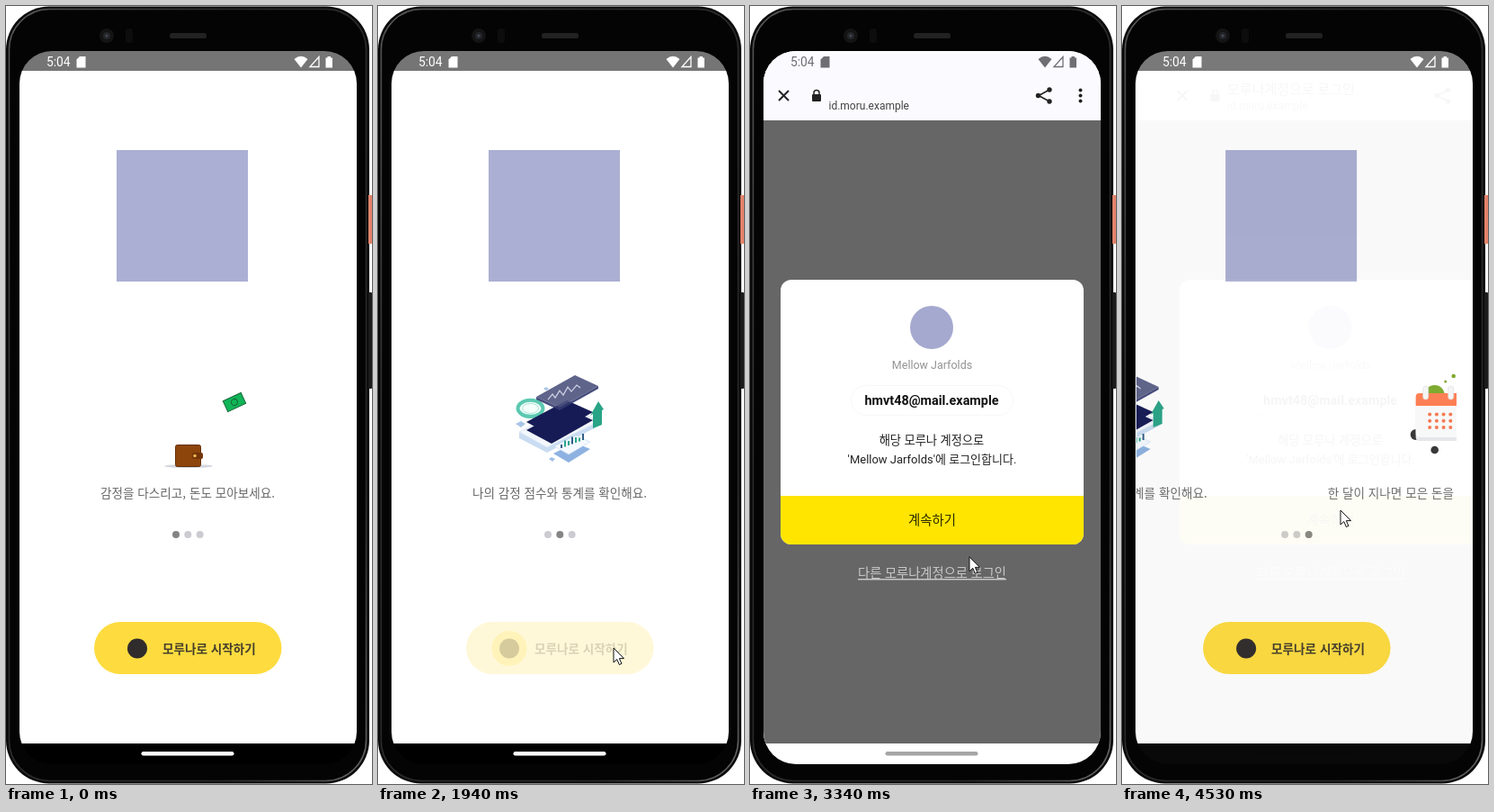
Recreate the animation shown at these times as an HTML page. Size 407x864 px, loop 4600 ms.

```html
<!DOCTYPE html>
<html lang="ko">
<head>
<meta charset="utf-8">
<title>Login flow</title>
<style>
  html, body { margin: 0; width: 100%; height: 100%; overflow: hidden; background: #fff; }
  svg { display: block; width: 100%; height: 100%; }
  text { font-family: Roboto, "Noto Sans CJK KR", "Noto Sans CJK", sans-serif; }
  .ko { font-family: "Noto Sans CJK KR", "Noto Sans CJK", sans-serif; font-size: 13.6px; }
  .mid { text-anchor: middle; }
  .ic { fill: none; stroke-width: 2; }
</style>
</head>
<body>
<svg viewBox="0 0 407 864" preserveAspectRatio="none">
  <defs>
    <clipPath id="screen"><rect x="15" y="50" width="375" height="792" rx="36"/></clipPath>
    <clipPath id="view"><rect x="24" y="390" width="356" height="180"/></clipPath>
    <clipPath id="card"><rect x="34" y="304" width="337" height="294" rx="12"/></clipPath>
    <linearGradient id="rim" x2="1" y2="1">
      <stop offset="0" stop-color="#5a5a5a"/><stop offset=".3" stop-color="#2c2c2c"/>
      <stop offset=".8" stop-color="#2a2a2a"/><stop offset="1" stop-color="#666"/>
    </linearGradient>
  </defs>

  <!-- handset -->
  <rect x="0" y="0.500" width="404" height="863" rx="48" fill="#0a0a0a"/>
  <rect x="3.500" y="3.500" width="397" height="857" rx="45" fill="#040404" stroke="url(#rim)" stroke-width="1.500"/>
  <rect x="403" y="210" width="4" height="54" fill="#e3836b"/>
  <rect x="403" y="318" width="4" height="107" rx="1" fill="#1c1c1c"/>
  <circle cx="112" cy="33" r="8" fill="#141414"/>
  <circle cx="112" cy="33" r="4" fill="#24262a"/>
  <circle cx="112" cy="33" r="1.5" fill="#444a52"/>
  <rect x="133" y="25" width="8" height="16" rx="3" fill="#0d0d0d"/>
  <rect x="182" y="30" width="41" height="6" rx="2.5" fill="#222"/>

  <g clip-path="url(#screen)">
    <rect x="15" y="50" width="375" height="792"/>

    <g id="app">
      <rect class="wide" x="15" y="72" width="375" height="747" fill="#fff"/>
      <rect class="wide" x="15" y="50" width="375" height="22" fill="#757575"/>
      <rect x="123" y="160" width="146" height="146" fill="#abafd3"/>

      <g clip-path="url(#view)"><g id="slides" fill="#686868">
        <g>
          <ellipse cx="203" cy="511" rx="27" ry="2" fill="#d3d7df"/>
          <g id="bill">
            <rect x="-11" y="-6.5" width="22" height="13" fill="#10b557" stroke="#17683c"/>
            <circle r="3.5" fill="none" stroke="#17683c"/>
          </g>
          <rect x="188.500" y="487.500" width="28" height="24" rx="2" fill="#8d450b" stroke="#63300c"/>
          <rect x="207" y="496" width="12" height="7" rx="2" fill="#723408"/>
          <circle cx="210" cy="499.500" r="1.8" fill="#f0b450"/>
          <text class="ko mid" x="202" y="546">감정을 다스리고, 돈도 모아보세요.</text>
        </g>

        <g transform="translate(356)">
          <path d="M157 473L212 446L246 461V466L188 496L157 480Z" fill="#c9dcf1"/>
          <path d="M157 473L212 446L246 461L188 490Z" fill="#f3f7fd" stroke="#dde8f5"/>
          <path d="M165 471L210 447L239 460L193 486Z" fill="#161b55"/>
          <g id="bits">
            <path d="M153 464l6-3 5 3-5 4zM184 425l3-2 3 2-3 2z" fill="#a9c5e6"/>
          </g>
          <path d="M190 503l3-2 4 2-3 3z" fill="#a3c0e6"/>
          <g id="coin">
            <ellipse cy="2" rx="14" ry="9" fill="#43bea4"/>
            <ellipse id="disc" rx="14" ry="9" stroke="#5cc9b1"/>
            <ellipse rx="9" ry="5.5" fill="none" stroke="#a6e3d4"/>
          </g>
          <path id="ghost" d="M165 466L210 442L239 455L193 481Z" fill="#161b55"/>
          <g id="glass">
            <path d="M174 475L217 451L243 463L200 487Z" fill="#4e547f"/>
            <path d="M174 475L200 487V490L174 478ZM200 487L243 463V466L200 490Z" fill="#343b70"/>
            <path id="wave" d="M187 478l5-6 3 4 5-8 4 5 5-9 4 5 6-7 4 3" fill="none" stroke="#e6e9f6" stroke-width="1.300"/>
          </g>
          <path id="arrow" d="M245 438L251 447L249 448V464L239 468V452L236 454Z" fill="#29a487"/>
          <path d="M195 497L219 485L236 492L212 507Z" fill="#8db2e1"/>
          <path d="M196 489L220 477L236 484L212 498Z" fill="#f5f9ff" stroke="#c8dbf0" stroke-width=".6"/>
          <g id="bars" stroke-width="2"></g>
          <text class="ko mid" x="202" y="546">나의 감정 점수와 통계를 확인해요.</text>
        </g>

        <g transform="translate(712)">
          <circle cx="196" cy="432" r="11" fill="#79a828"/>
          <circle cx="217" cy="411" r="2.300" fill="#79a828"/><circle cx="208" cy="417" r="1.500" fill="#79a828"/>
          <circle cx="175" cy="476" r="6" fill="#303030"/><circle cx="196" cy="493" r="4.300" fill="#303030"/>
          <rect x="175" y="431" width="55" height="52" rx="4" fill="#e4e6ea"/>
          <rect x="175" y="431" width="55" height="48" rx="4" fill="#f8f8f9"/>
          <path d="M175 444V434Q175 430 179 430H226Q230 430 230 434V444Z" fill="#ff7a4f"/>
          <g fill="#f5f5f5" stroke="#dcdcdc" stroke-width=".6">
            <rect x="183" y="422" width="6" height="15" rx="3"/><rect x="211" y="422" width="6" height="15" rx="3"/>
          </g>
          <g id="days" fill="#f5744a"></g>
          <text class="ko" x="77" y="546">한 달이 지나면 모은 돈을 돌려받을 수 있어요.</text>
        </g>
      </g></g>

      <g id="dots"><circle cx="189" cy="587" r="4"/><circle cx="202.300" cy="587" r="4"/><circle cx="215.600" cy="587" r="4"/></g>

      <rect class="press" x="98" y="684" width="208.500" height="58" rx="29" fill="#fedc3f"/>
      <circle class="press" cx="146" cy="713.500" r="19.500" fill="#fedc3f"/>
      <circle class="press" cx="146" cy="713.500" r="11" fill="#312c2c"/>
      <text class="ko press" x="174" y="718.500" font-weight="700" fill="#453e2b">모루나로 시작하기</text>
    </g>

    <g id="web">
      <rect x="-30" y="50" width="480" height="792" fill="#fff"/>
      <g id="page">
        <rect x="-30" y="50" width="480" height="77" fill="#fbfbff"/>
        <rect x="-30" y="127" width="480" height="692" fill="#666"/>
        <g clip-path="url(#card)">
          <rect x="34" y="304" width="337" height="294" fill="#fff"/>
          <rect id="go" x="34" y="544" width="337" height="54"/>
        </g>
        <circle cx="202" cy="357" r="24" fill="#a5a9cf"/>
        <rect x="112.500" y="421.500" width="180" height="33" rx="16.500" fill="none" stroke="#f7f7f7"/>
        <g class="mid">
          <text x="202.500" y="403" font-size="12.500" fill="#929292">Mellow Jarfolds</text>
          <text x="202" y="443" font-size="14.400" font-weight="700" fill="#111">hmvt48@mail.example</text>
          <text x="202" y="486.500" font-size="13.300" fill="#222">해당 모루나 계정으로</text>
          <text x="202.500" y="507.500" font-size="13" fill="#222">'Mellow Jarfolds'에 로그인합니다.</text>
          <text x="202.500" y="576" font-size="14.400" fill="#2c2800">계속하기</text>
          <text x="202.500" y="635" font-size="14.300" fill="#c9c9c9" text-decoration="underline">다른 모루나계정으로 로그인</text>
        </g>
        <rect x="69" y="98" width="10" height="8" rx="1" fill="#222"/>
        <path class="ic" d="M71 99V96.500a3 3 0 0 1 6 0V99" stroke="#222" style="stroke-width:1.500"/>
        <text id="title" x="87.500" y="98" font-size="15" fill="#222">모루나계정으로 로그인</text>
        <text x="87.500" y="115" font-size="12" fill="#444">id.moru.example</text>
      </g>
      <g id="load">
        <circle class="ic" cx="74" cy="99.500" r="7" stroke="#333" style="stroke-width:1.600"/>
        <path d="M73.200 98.500h1.700v4.500h-1.700zM73.200 95.500h1.700v1.700h-1.700z" fill="#333"/>
        <text x="87.500" y="104" font-size="12" fill="#333">id.moru.example</text>
      </g>
      <path class="ic" d="M32 94l11 11M43 94l-11 11" stroke="#222"/>
      <path class="ic" d="M333 93l-12 6.500 12 6.500" stroke="#222" style="stroke-width:1.600"/>
      <g fill="#222">
        <circle cx="333" cy="93" r="2.700"/><circle cx="320.500" cy="99.500" r="2.700"/><circle cx="333" cy="106" r="2.700"/>
        <circle cx="367.500" cy="93.500" r="2"/><circle cx="367.500" cy="99.500" r="2"/><circle cx="367.500" cy="105.500" r="2"/>
      </g>
      <g id="track">
        <rect x="15" y="124" width="375" height="2.500" fill="#dfe3ef"/>
        <rect id="bar" x="15" y="124" height="2.500" fill="#7d84b5"/>
      </g>
    </g>

    <g id="status">
      <text x="45" y="67" font-size="13.800">5:04</text>
      <path d="M82 56h6.500v12.500h-10V59.500z"/>
      <path d="M328 68.500L320.500 59Q328 52.500 335.500 59Z"/>
      <path d="M348 56.500V67.500H338Z" fill="none" stroke="currentColor" stroke-width="1.300"/>
      <path d="M355.500 57.500h2V56h3.500v1.500h2V68.500h-7.500z"/>
    </g>
    <rect id="handle" x="150.500" y="828" width="103" height="4.500" rx="2.200"/>
  </g>

  <path id="cursor" d="M0 0V16L3.800 12.500L6.300 18.500L8.900 17.400L6.400 11.600H11.500Z" fill="#fff" stroke="#111" stroke-linejoin="round"/>
</svg>

<script>
const LOOP = 4600, PAGE = 356, PUSH = 37.5;
const $ = id => document.getElementById(id);
const set = (id, attrs) => { for (const k in attrs) $(id).setAttribute(k, attrs[k]); };
const all = (sel, key, val) => document.querySelectorAll(sel).forEach(e => e.setAttribute(key, val));
const move = (id, x, y = 0, extra = '') => set(id, { transform: `translate(${x} ${y}) ${extra}` });
const show = (id, on) => { $(id).style.display = on ? '' : 'none'; };
const span = (t, a, d) => Math.min(1, Math.max(0, (t - a) / d));
const mix = (a, b, p) => a + (b - a) * p;
const easeOut = x => 1 - (1 - x) ** 3;
const easeBoth = x => x < .5 ? 4 * x ** 3 : 1 - 4 * (1 - x) ** 3;

// [time, values...] rows, linear in between
function track(rows, t) {
  let i = 0;
  while (i < rows.length - 2 && t >= rows[i + 1][0]) i++;
  const a = rows[i], b = rows[i + 1], p = span(t, a[0], b[0] - a[0]);
  return a.slice(1).map((v, k) => mix(v, b[k + 1], p));
}

const POINTER = [[260, 300, 15], [490, 269, 685], [560, 265, 710], [700, 262, 713],
  [3200, 262, 713], [3340, 244, 612], [3550, 243, 560]];
const HANDLE = [[2850, 255], [3060, 185], [3340, 166], [4390, 120], [4450, 110], [4520, 8]];

for (let i = 0; i < 12; i++) {
  $('days').innerHTML += `<circle cx="${190.5 + i % 4 * 7.7}" cy="${453.5 + (i >> 2) * 7.3}" r="2"/>`;
}
for (let i = 0; i < 7; i++) {
  const x = 204 + i * 4, y = 491 - i * 1.5;
  $('bars').innerHTML += `<path d="M${x} ${y}v${-4 - i * 3 % 5}" stroke="${i % 3 ? '#2ba58a' : '#2f5f86'}"/>`;
}

function carousel(t) {
  const pos = easeBoth(span(t, 405, 280)) + easeBoth(span(t, 4386, 280));
  move('slides', -PAGE * pos);
  [...$('dots').children].forEach((d, i) =>
    d.setAttribute('fill', i === Math.round(pos) ? '#858585' : '#cbcbd1'));

  const fall = span(t, 0, 420) ** 1.4;
  move('bill', mix(254, 202, fall), mix(440, 500, fall), `rotate(${mix(-25, -70, fall)})`);

  const rise = easeOut(span(t, 1080, 400));
  const bob = Math.sin((t - 1260) / 350) * rise;
  move('glass', mix(0, 2, rise), -40 * rise - bob);
  set('glass', { opacity: rise > 0 ? .9 : 0 });
  move('ghost', 0, -4 * rise);
  set('ghost', { opacity: rise });
  set('wave', { opacity: span(t, 1600, 300) * .8 });
  move('coin', mix(176, 169.5, rise), mix(449, 443, rise) + 2 * (bob + 1) * span(t, 1300, 600));
  set('disc', { fill: rise > .4 ? '#f4fffb' : '#b9e3da', 'stroke-width': mix(1, 4, rise) });
  const grow = easeOut(span(t, 1100, 200));
  move('arrow', 0, 468 * (1 - grow) + Math.max(0, bob), `scale(1 ${grow})`);
  set('bits', { opacity: rise });
}

function browser(t) {
  const inX = span(t, 2290, 200), outX = span(t, 4450, 200);
  const closing = outX > 0;
  const cover = closing ? 1 - easeOut(outX) : easeOut(inX);
  move('app', -PUSH * cover);
  move('web', PUSH * (1 - cover));
  set('web', { opacity: closing ? Math.max(0, 1 - outX / .42) : Math.min(1, inX / .58) });
  all('.wide', 'width', closing ? 420 : 375);

  const ready = t >= 2640;
  show('page', ready);
  show('load', !ready);
  show('title', t >= 3410);
  set('go', { fill: t >= 3760 ? '#f6d902' : '#ffe500' });

  const posting = t >= 3900 && t < 4250;
  show('track', !ready || posting);
  set('bar', { width: ready ? 375 * span(t, 3900, 330) : mix(19, 375, span(t, 2400, 230)) });

  const tone = ready && !closing ? '#6f6f73' : '#fff';
  $('status').style.fill = $('status').style.color = tone;
  const v = Math.round(track(HANDLE, t)[0]);
  set('handle', { fill: `rgb(${v},${v},${v})` });
}

function render(t) {
  carousel(t);
  browser(t);
  all('.press', 'opacity', t < 2600 ? mix(1, .2, span(t, 1170, 90)) : 1);
  show('cursor', t >= 260);
  move('cursor', ...track(POINTER, t));
}

const start = performance.now();
function tick() {
  render((performance.now() - start) % LOOP);
  requestAnimationFrame(tick);
}
tick();
</script>
</body>
</html>
```
